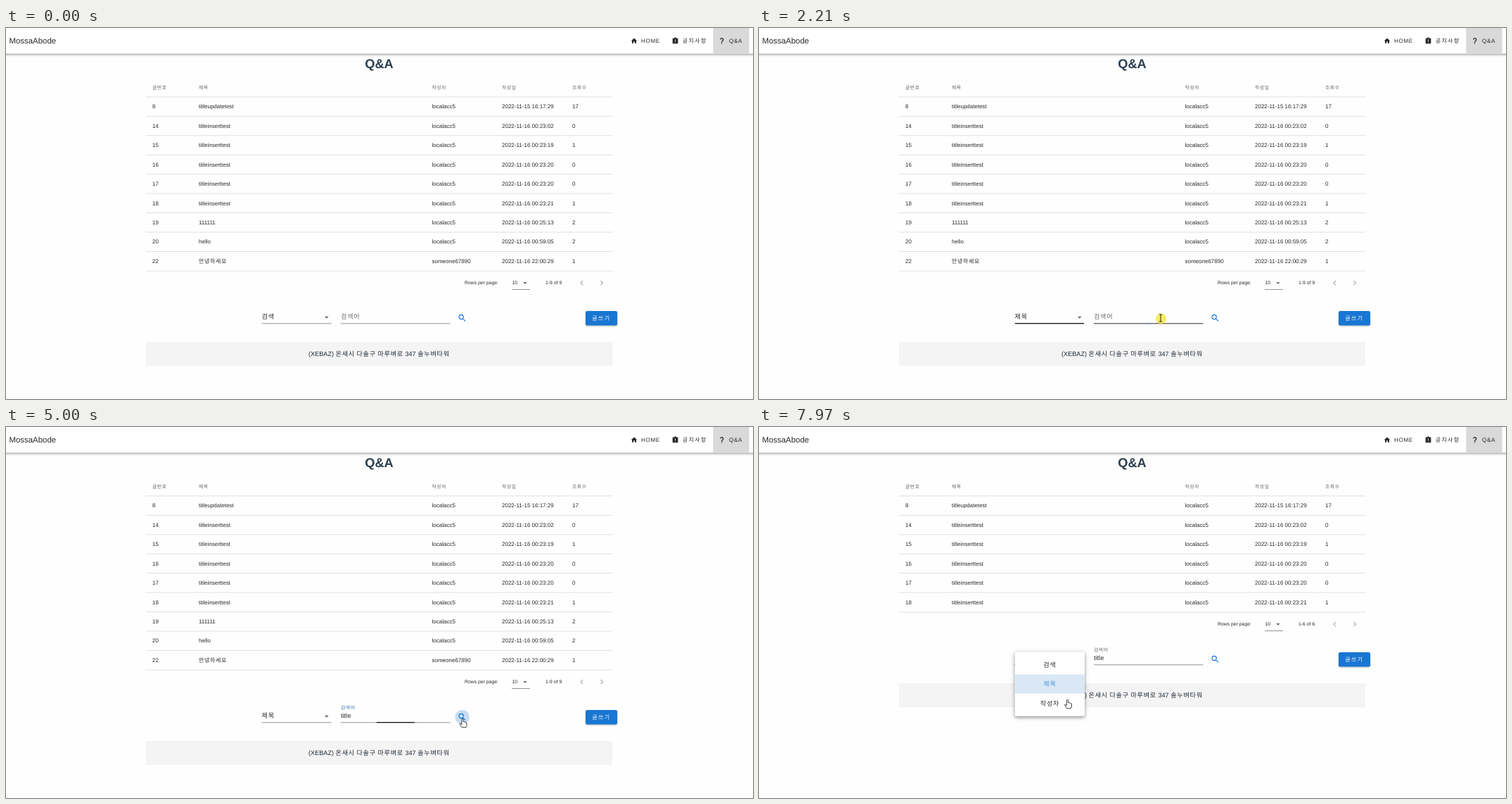
An HTML page for the animation above (8000 ms loop, 1062x527 px).

```html
<!DOCTYPE html>
<html lang="ko">
<head>
<meta charset="utf-8">
<title>Q&amp;A</title>
<style>
html, body { margin: 0; width: 100%; height: 100%; overflow: hidden; background: #fefefe; }
svg { display: block; width: 100%; height: 100%; }
text { font-family: "Liberation Sans", "Noto Sans CJK KR", "Noto Sans CJK", sans-serif; white-space: pre; text-rendering: geometricPrecision; }
.bar { filter: drop-shadow(0 1px 1px rgba(0,0,0,.3)) drop-shadow(0 1px 2px rgba(0,0,0,.2)); }
.btn { filter: drop-shadow(0 1px 1px rgba(0,0,0,.28)); }
.menu { filter: drop-shadow(0 2px 2px rgba(0,0,0,.28)) drop-shadow(0 1px 3px rgba(0,0,0,.2)); }
</style>
</head>
<body>
<svg id="stage" viewBox="0 0 1062 527"></svg>
<script>
const LOOP = 8000, SHIFT = 82;
const INK = 'rgba(0,0,0,.84)', SOFT = 'rgba(0,0,0,.6)', RULE = 'rgba(0,0,0,.12)', BLUE = '#1976d2';
const BASE = 413.3, LINE = 419.8;
const svg = document.getElementById('stage');

function el(tag, attrs, parent = svg) {
  const node = document.createElementNS('http://www.w3.org/2000/svg', tag);
  set(node, attrs);
  parent.append(node);
  return node;
}
function set(node, attrs) {
  for (const k in attrs) node.setAttribute(k, attrs[k]);
}
function show(node, on) {
  node.style.display = on ? '' : 'none';
}
// Hangul runs get a full em of advance.
function fillText(node, str, gap = 0) {
  if (node.dataset.str === str) return;
  node.dataset.str = str;
  node.textContent = '';
  for (const run of str.match(/[가-힣]+|[^가-힣]+/g) || []) {
    const hangul = /[가-힣]/.test(run);
    const span = el('tspan', { 'letter-spacing': gap + (hangul ? 0.08 : 0) + 'em' }, node);
    span.textContent = run;
  }
}
function text(str, x, y, size, parent = svg, attrs = {}, gap = 0) {
  const node = el('text', { x, y, 'font-size': size, fill: INK, ...attrs }, parent);
  fillText(node, str, gap);
  return node;
}
function rect(x, y, width, height, fill, parent = svg, attrs = {}) {
  return el('rect', { x, y, width, height, fill, ...attrs }, parent);
}
function hline(x1, x2, y, stroke, parent = svg, w = 1) {
  return el('path', { d: `M${x1} ${y}H${x2}`, stroke, 'stroke-width': w }, parent);
}
function icon(d, cx, cy, size, fill, parent = svg) {
  const k = size / 24;
  return el('path', { d, fill, 'fill-rule': 'evenodd',
    transform: `translate(${cx - size / 2} ${cy - size / 2}) scale(${k})` }, parent);
}

// Table
text('Q&A', 530.5, 56.6, 18.27, svg, { 'font-weight': 700, fill: '#2c3e50', 'text-anchor': 'middle' });
const COLS = [208, 274, 605.5, 705, 805];
['글번호', '제목', '작성자', '작성일', '조회수'].forEach((s, i) => text(s, COLS[i], 86.7, 6.85, svg, { fill: SOFT }));
const USER = 'localacc5', INSERT = 'titleinserttest';
const rows = [
  [8, 'titleupdatetest', USER, '15 16:17:29', 17],
  [14, INSERT, USER, '16 00:23:02', 0],
  [15, INSERT, USER, '16 00:23:19', 1],
  [16, INSERT, USER, '16 00:23:20', 0],
  [17, INSERT, USER, '16 00:23:20', 0],
  [18, INSERT, USER, '16 00:23:21', 1],
  [19, '111111', USER, '16 00:25:13', 2],
  [20, 'hello', USER, '16 00:59:05', 2],
  [22, '안녕하세요', 'someone67890', '16 22:00:29', 1]
].map((row, i) => {
  const g = el('g', {});
  hline(199, 862, 97.9 + 27.45 * i, RULE, g);
  row.forEach((v, c) => text(c === 3 ? '2022-11-' + v : String(v), COLS[c], 114.3 + 27.45 * i, 8, g));
  return g;
});

// Everything under the table moves up when the list shrinks
const low = el('g', {});
hline(199, 862, 345.1, RULE, low);
const CARET = 'M7,10L12,15L17,10Z';
text('Rows per page:', 652, 364.3, 6.85, low);
text('10', 719.5, 364.3, 6.85, low);
icon(CARET, 738, 362, 13, SOFT, low);
hline(719, 745, 371.5, 'rgba(0,0,0,.42)', low);
const count = text('1-9 of 9', 767, 364.3, 6.85, low);
icon('M15.41,16.58L10.83,12L15.41,7.41L14,6L8,12L14,18Z', 818.5, 362, 13.7, 'rgba(0,0,0,.32)', low);
icon('M8.59,16.58L13.17,12L8.59,7.41L10,6L16,12L10,18Z', 847, 362, 13.7, 'rgba(0,0,0,.32)', low);

const choice = text('검색', 363.5, BASE, 9.13, low);
icon(CARET, 455.8, 411, 13.7, SOFT, low);
const pickLine = hline(363.5, 462.5, LINE, '#000', low);
const pickFocus = hline(363.5, 462.5, LINE, BLUE, low, 1.3);
const label = text('검색어', 476, BASE, 9.13, low);
const typed = text('', 476, BASE, 9.13, low);
const caret = rect(0, 405.5, 0.8, 10, BLUE, low);
const fieldLine = hline(476, 631.5, LINE, '#000', low);
const fieldFocus = hline(476, 631.5, LINE, BLUE, low, 1.3);

const halo = el('circle', { cx: 648.6, cy: 412, r: 10.3, fill: BLUE }, low);
icon('M9.5,3A6.5,6.5 0 0,1 16,9.5C16,11.11 15.41,12.59 14.44,13.73L14.71,14H15.5L20.5,19L19,20.5L14,15.5V14.71L13.73,14.44C12.59,15.41 11.11,16 9.5,16A6.5,6.5 0 0,1 3,9.5A6.5,6.5 0 0,1 9.5,3M9.5,5C7,5 5,7 5,9.5C5,12 7,14 9.5,14C12,14 14,12 14,9.5C14,7 12,5 9.5,5Z',
  648.6, 412, 13.7, BLUE, low);
rect(824, 402, 45, 20.5, BLUE, low, { rx: 2.3, class: 'btn' });
text('글쓰기', 833.3, 415.3, 8, low, { fill: '#fff', 'font-weight': 500 }, 0.089);

rect(199, 446, 663, 34, '#f4f4f4', low);
text('(XEBAZ) 온새시 다솔구 마루벼로 347 솔누벼타워', 430, 466, 9.13, low, { fill: '#1f2a36' });

const menu = el('g', {}, low);
rect(363.7, 401.5, 99.3, 91.2, '#fff', menu, { rx: 2.3, class: 'menu' });
const items = ['검색', '제목', '작성자'].map((s, i) => {
  const y = 406 + 27.4 * i;
  return {
    bg: rect(363.7, y, 99.3, 27.4, 'none', menu),
    label: text(s, 413.5, y + 16.7, 9.13, menu, { 'text-anchor': 'middle' })
  };
});
el('rect', { x: 363.7, y: 433.4, width: 99.3, height: 27.4 }, el('clipPath', { id: 'item' }));
const ripple = el('circle', { cx: 412, cy: 453, 'clip-path': 'url(#item)' }, menu);

// App bar
rect(-10, -10, 1082, 46.6, '#fff', svg, { class: 'bar' });
rect(1005.3, 0, 51.2, 36.6, '#d9d9d9');
text('MossaAbode', 4.5, 22.3, 11.42);
icon('M10,20V14H14V20H19V12H22L12,3L2,12H5V20H10Z', 893, 18.3, 10.3, INK);
icon('M5,3H9A3,3 0 0,1 15,3H19A2,2 0 0,1 21,5V19A2,2 0 0,1 19,21H5A2,2 0 0,1 3,19V5A2,2 0 0,1 5,3M11,7H13V13H11ZM11,15H13V17H11Z', 951.5, 18.3, 10.3, INK);
icon('M10,19H13V22H10V19M12,2C17.35,2.22 19.68,7.62 16.5,11.67C15.67,12.67 14.33,13.33 13.67,14.17C13,15 13,16 13,17H10C10,15.33 10,13.92 10.67,12.92C11.33,11.92 12.67,11.33 13.5,10.67C15.92,8.43 15.32,5.26 12,5A3,3 0 0,0 9,8H6A6,6 0 0,1 12,2Z', 1017.8, 18.3, 10.3, INK);
text('HOME', 903, 21.2, 8, svg, {}, 0.089);
text('공지사항', 961.7, 21.2, 8, svg, {}, 0.089);
text('Q&A', 1028, 21.2, 8, svg, {}, 0.089);

// Pointer
const pointer = el('g', {});
const spot = el('circle', { cx: 0.5, cy: 1, r: 7.5, fill: '#f2e21c', opacity: 0.7 }, pointer);
const shapes = {
  arrow: el('path', { d: 'M0 0V9.6L2.2 7.6L3.7 11L5.3 10.3L3.8 7H6.8Z', fill: '#fff', stroke: '#111', 'stroke-width': 0.7 }, pointer),
  hand: el('path', { d: 'M-1.1 .9Q0 -.6 1.1 .9V4.6L4 5.1Q6 5.5 6 7V9.5Q5.8 11 5 12.7H-1L-3.8 8.2Q-4 7 -2.9 7.1L-1.1 8.6Z', fill: '#fff', stroke: '#111', 'stroke-width': 0.8 }, pointer),
  beam: el('path', { d: 'M-2 -5H2M0 -5V5M-2 5H2', fill: 'none', stroke: '#111', 'stroke-width': 0.9 }, pointer)
};

const clamp = p => Math.max(0, Math.min(1, p));
const ramp = (t, from, dur) => clamp((t - from) / dur);
const out = p => 1 - (1 - p) ** 3;
const smooth = p => p * p * (3 - 2 * p);
const linear = p => p;
const mix = (a, b, p) => a + (b - a) * p;
const within = (t, a, b) => t >= a && t < b;

// time, x, y, easing towards that point
const PATH = [
  [70, 1012, 519], [590, 440, 404, p => 1 - (1 - p) ** 2],
  [1000, 440, 404], [1450, 412, 453, smooth],
  [1660, 412, 453], [1940, 571, 412, smooth],
  [2210, 571, 412], [2400, 571, 405, smooth],
  [4050, 571, 405], [4550, 656, 413, smooth], [4800, 649, 414, smooth],
  [5690, 649, 414], [5900, 697, 415, p => p ** 1.5], [6450, 972, 524, linear],
  [6520, 984, 522], [7290, 440, 332, smooth],
  [7560, 440, 332], [7900, 438.5, 387, smooth]
];
const KINDS = [[0, 'arrow'], [530, 'beam'], [1050, 'arrow'], [1800, 'beam'], [4420, 'hand'],
  [5350, 'arrow'], [7230, 'beam'], [7620, 'hand']];
const KEYS = [3180, 3265, 3350, 3435, 3520];
const CLICKS = [[770, 900], [1470, 1640], [2190, 2300], [4860, 4960], [7400, 7520]];

function place(t) {
  const i = PATH.findIndex(p => p[0] > t);
  if (i === 0) return PATH[0].slice(1, 3);
  if (i < 0) return PATH[PATH.length - 1].slice(1, 3);
  const a = PATH[i - 1], b = PATH[i];
  const p = (b[3] || linear)((t - a[0]) / (b[0] - a[0]));
  return [mix(a[1], b[1], p), mix(a[2], b[2], p)];
}

// Underline that grows from its centre and shrinks back dark on blur
function focusLine(node, x1, x2, t, on, off) {
  const grown = out(ramp(t, on, 300)) * (1 - out(ramp(t, off, 300)));
  const mid = (x1 + x2) / 2, half = (x2 - x1) / 2 * grown;
  set(node, { d: `M${mid - half} ${LINE - 0.2}H${mid + half}`, stroke: t < off ? BLUE : '#111a24' });
  show(node, grown > 0.005);
}

function draw(t) {
  const found = t >= 5200, second = t >= 6500;
  rows.forEach((g, i) => show(g, !found || i < 6));
  low.setAttribute('transform', `translate(0 ${found ? -SHIFT : 0})`);
  fillText(count, found ? '1-6 of 6' : '1-9 of 9');

  fillText(choice, t < 1640 ? '검색' : '제목');
  const overPick = within(t, 540, 1640) || t >= 7230;
  const overField = within(t, 1870, 4420);
  pickLine.setAttribute('stroke', overPick ? INK : 'rgba(0,0,0,.42)');
  fieldLine.setAttribute('stroke', overField ? INK : 'rgba(0,0,0,.42)');
  if (second) focusLine(pickFocus, 363.5, 462.5, t, 7420, 9999);
  else focusLine(pickFocus, 363.5, 462.5, t, 790, 2210);
  focusLine(fieldFocus, 476, 631.5, t, 2210, 4912);

  const rise = out(ramp(t, 2210, 300));
  const tint = ramp(t, 2210, 200) * (1 - ramp(t, 4912, 240));
  const rgb = [25, 118, 210].map(c => Math.round(mix(105, c, tint)));
  set(label, { y: mix(BASE, 400.7, rise), 'font-size': mix(9.13, 6.85, rise), fill: `rgb(${rgb})` });

  const n = KEYS.filter(k => t >= k).length;
  fillText(typed, 'title'.slice(0, n));
  const advance = [0, 0.278, 0.5, 0.778, 1, 1.556][n] * 9.13;
  caret.setAttribute('x', 476.3 + advance);
  show(caret, within(t, 2250, 2950) || within(t, 3180, 4050) || within(t, 4550, 4912));

  const hover = ramp(t, 4420, 150) * 0.12 + ramp(t, 4900, 90) * 0.12;
  halo.setAttribute('opacity', found ? 0 : hover);

  const open = second ? ramp(t, 7440, 200) : ramp(t, 800, 200) * (1 - ramp(t, 1650, 250));
  menu.setAttribute('opacity', open);
  show(menu, open > 0);
  const picked = t < 1640 ? 0 : 1;
  items.forEach((it, i) => {
    const hot = i === 1 && within(t, 1250, 1760);
    it.bg.setAttribute('fill', i === picked ? '#dae8f6' : hot ? '#f3f3f3' : 'none');
    set(it.label, { fill: i === picked ? BLUE : INK, opacity: i === picked ? 0.75 : 1 });
  });
  const spread = ramp(t, 1470, 300);
  set(ripple, { r: 4 + 38 * spread, opacity: 0.18 * (1 - ramp(t, 1680, 220)) });
  show(ripple, within(t, 1470, 1900));

  const [x, y] = place(t);
  pointer.setAttribute('transform', `translate(${x} ${y})`);
  show(pointer, t >= 70 && !within(t, 6450, 6520));
  const kind = KINDS.filter(k => t >= k[0]).pop()[1];
  for (const k in shapes) show(shapes[k], k === kind);
  show(spot, CLICKS.some(c => within(t, c[0], c[1])));
}

const start = performance.now();
function tick() {
  draw((performance.now() - start) % LOOP);
  requestAnimationFrame(tick);
}
tick();
</script>
</body>
</html>
```
